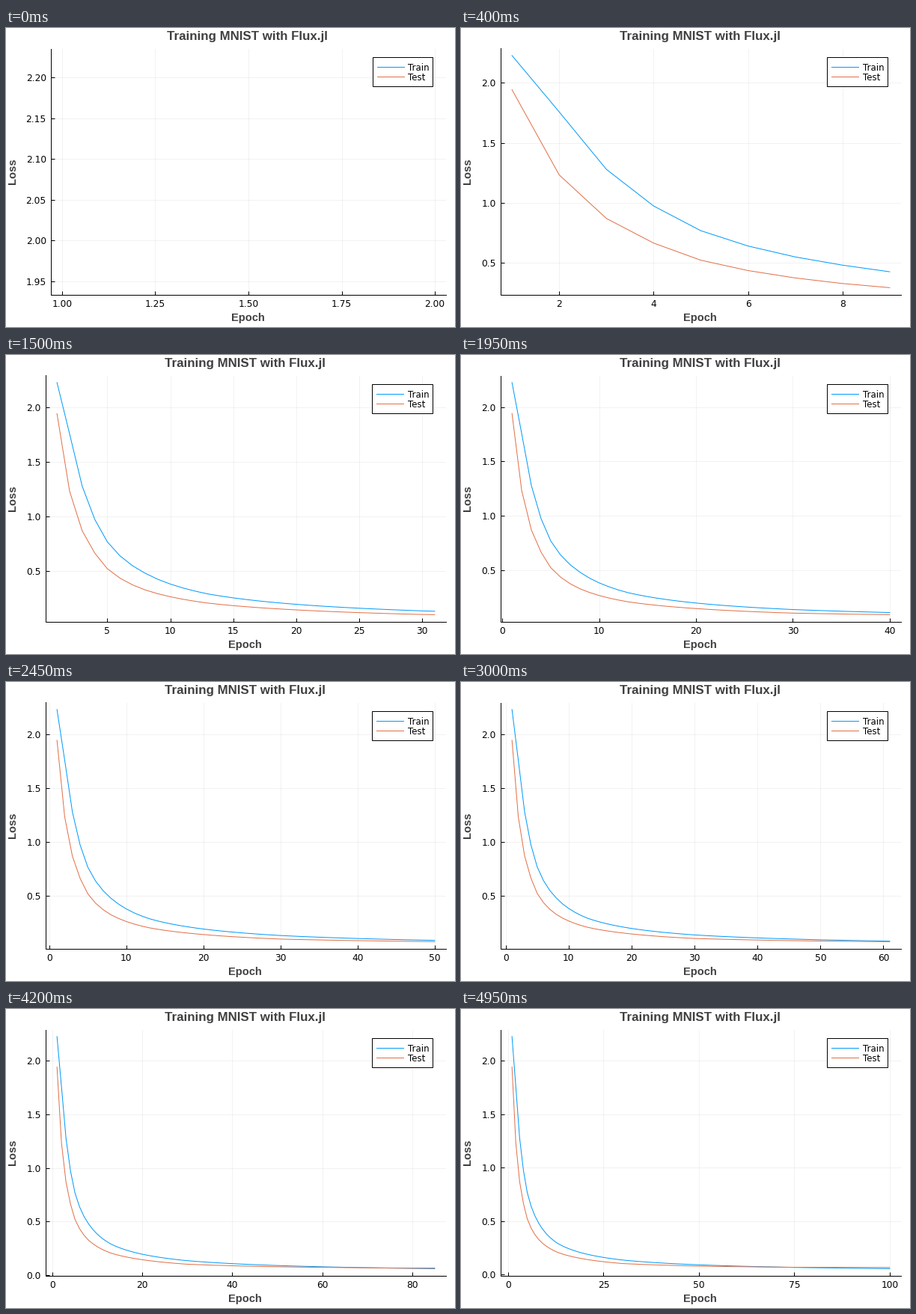
These frames come from a looping animation (600x400 px, 5 s). A matplotlib script:

```python
import math

import numpy as np
import matplotlib.pyplot as plt
from matplotlib.animation import FuncAnimation
from matplotlib.lines import Line2D
from matplotlib.patches import Rectangle
from matplotlib.transforms import Affine2D

W, H, DPI = 600, 400, 100
PX = 72 / DPI
EPOCHS = 100
TOP, BOTTOM, RIGHT = 27.5, 356.7, 588
BLUE, ORANGE, GREY = "#009afa", "#e36f47", "#404040"

# Key epochs; the loss follows a power law between them
KEYS = [1, 2, 3, 4, 5, 8, 13, 20, 30, 50, 75, 100]
epochs = np.arange(1, EPOCHS + 1)


def loss_curve(values):
    return np.exp(np.interp(np.log(epochs), np.log(KEYS), np.log(values)))


train = loss_curve([2.227, 1.757, 1.278, .973, .767, .48,
                    .29, .195, .135, .09, .066, .054])
test = loss_curve([1.942, 1.232, .869, .664, .521, .327,
                   .206, .144, .102, .078, .067, .065])

# Candidate tick steps and how round each one is
STEPS = [(1, 1), (5, .9), (2, .7), (2.5, .5), (3, .2)]


def nice_ticks(lo, hi):
    """Score candidate steps by count, coverage and roundness."""
    span = hi - lo
    best, ticks = -math.inf, []
    top = math.ceil(math.log10(span))
    for power in range(top, top - 3, -1):
        for k in range(2, 17):
            for q, nice in STEPS:
                step = q * 10.0 ** power
                width = (k - 1) * step
                if not span <= width < 2 * span:
                    continue
                first = math.ceil((hi - width) / step)
                if first * step > lo:
                    continue
                inside = [i * step for i in range(first, first + k)
                          if lo <= i * step <= hi]
                n = len(inside)
                if not 4 <= n <= 8:
                    continue
                zero = first <= 0 and -first < k
                score = (.25 * (1 - abs(n - 5) / 5) + zero / 6
                         + .5 * span / ((n - 1) * step) + .25 * nice)
                if score > best + 1e-9:
                    best, ticks = score, inside
    return ticks


def decimals(ticks):
    return next(d for d in range(5)
                if all(abs(round(t, d) - t) < 1e-8 for t in ticks))


def widen(lo, hi):
    pad = .03 * (hi - lo)
    return lo - pad, hi + pad


fig = plt.figure(figsize=(W / DPI, H / DPI), dpi=DPI, facecolor="white")
pixels = Affine2D().scale(1, -1).translate(0, H)

ax = fig.add_axes([.1, .1, .8, .8])
ax.spines[["top", "right"]].set_visible(False)
ax.spines[["left", "bottom"]].set_linewidth(PX)
ax.set_axisbelow(True)
ax.grid(True, color="black", alpha=.05, linewidth=PX)
ax.tick_params(direction="in", length=5 * PX, width=PX, labelsize=12.2 * PX,
               labelfontfamily="DejaVu Sans")
ax.tick_params(axis="x", pad=6.3 * PX)
ax.tick_params(axis="y", pad=6.2 * PX)
train_line, = ax.plot([], [], color=BLUE, lw=PX)
test_line, = ax.plot([], [], color=ORANGE, lw=PX)


def heading(x, y, text, size, ha="center", va="baseline", **kw):
    return fig.text(x, y, text, transform=pixels, ha=ha, va=va,
                    family="Liberation Sans", weight="bold", color=GREY,
                    fontsize=size * PX, **kw)


title = heading(0, 16, "Training MNIST with Flux.jl", 16.85)
x_label = heading(0, 391.6, "Epoch", 14.6)
heading(16, 192, "Loss", 14.7, ha="right", va="center", rotation=90)

legend_box = Rectangle((0, 39), 81, 39, transform=pixels, fc="white",
                       ec="black", lw=PX, zorder=5)
fig.add_artist(legend_box)
legend_keys = []
for name, color, y in (("Train", BLUE, 52), ("Test", ORANGE, 65)):
    key = Line2D([0, 0], [y, y], color=color, lw=PX, transform=pixels, zorder=6)
    fig.add_artist(key)
    legend_keys.append(key)
    fig.text(537, y + 4.7, name, transform=pixels, va="baseline",
             family="DejaVu Sans", fontsize=11.8 * PX, zorder=6)


def place(left):
    """Lay out everything that depends on the left margin."""
    ax.set_position([left / W, 1 - BOTTOM / H,
                     (RIGHT - left) / W, (BOTTOM - TOP) / H])
    middle = (left + RIGHT) / 2
    title.set_x(middle - 1.2)
    x_label.set_x(middle - 1)
    shift = (left - 53) / 7
    legend_box.set_x(489 + shift)
    legend_box.set_width(81 - shift)
    for key in legend_keys:
        key.set_xdata([495 + shift, 531 + shift])


def draw(frame):
    n = frame + 1
    train_line.set_data(epochs[:n], train[:n])
    test_line.set_data(epochs[:n], test[:n])

    xlim = widen(1, max(n, 2))
    ylim = widen(min(train[:n].min(), test[:n].min()), train[0])
    xticks, yticks = nice_ticks(*xlim), nice_ticks(*ylim)
    x_dec, y_dec = decimals(xticks), decimals(yticks)
    ax.set_xticks(xticks, [f"{t:.{x_dec}f}" for t in xticks])
    ax.set_yticks(yticks, [f"{t:.{y_dec}f}" for t in yticks])
    ax.set_xlim(xlim)
    ax.set_ylim(ylim)
    place(60 if y_dec == 2 else 53)
    return train_line, test_line


anim = FuncAnimation(fig, draw, frames=EPOCHS, interval=50, repeat=True,
                     repeat_delay=0, blit=False)
plt.show()
```
